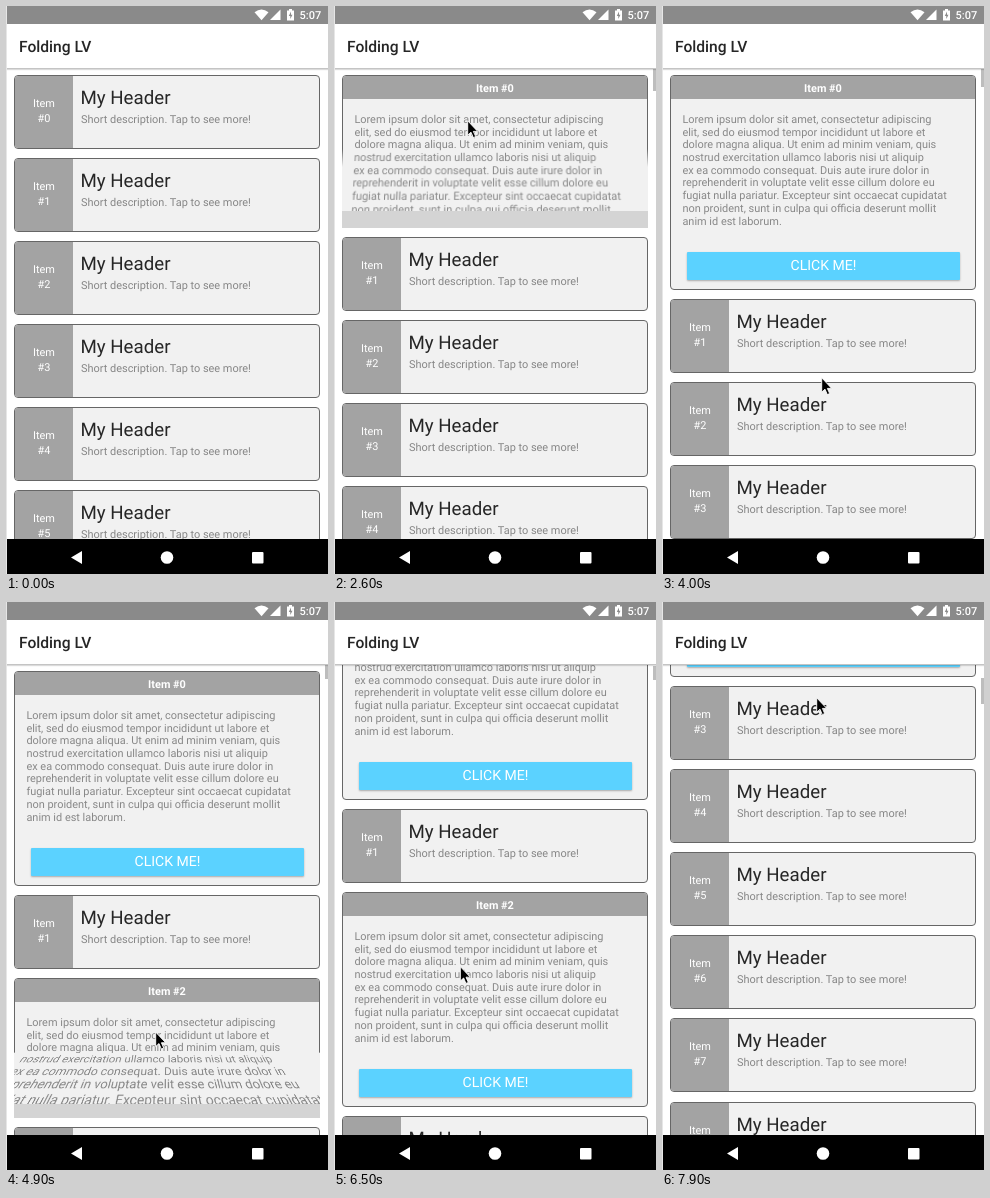
Recreate the animation shown at these times as an HTML page. Size 322 by 568 pixels, loop 8000 ms.

```html
<!DOCTYPE html>
<html lang="en">
<head>
<meta charset="utf-8">
<title>Folding list</title>
<style>
html, body { margin: 0; width: 100%; height: 100%; overflow: hidden; background: #fff; }
#stage { position: relative; width: 322px; height: 568px; overflow: hidden; background: #fff;
  font: 10.94px/12.7px Roboto, sans-serif; white-space: nowrap; text-rendering: geometricPrecision; }
#stage div, #stage svg { position: absolute; box-sizing: border-box; }
.cell { left: 8px; width: 306px; overflow: hidden; }
.part { left: 0; width: 306px; overflow: hidden; }
.face { left: 0; width: 306px; border: 1px solid #666; border-radius: 4px; background: #f1f1f1; overflow: hidden; }
.title { height: 74px; }
.content { height: 215px; }
.tag { left: 0; top: 0; width: 58px; height: 72px; padding-top: 20.4px; background: #a3a3a3; color: #fff;
  line-height: 15px; text-align: center; }
.head { left: 65.5px; top: 10.6px; font-size: 18.7px; line-height: 22px; color: #262626; }
.desc { left: 66px; top: 38.4px; color: #868686; }
.bar { left: 0; top: 0; width: 304px; height: 23px; background: #a3a3a3; color: #fff; font-weight: 700;
  line-height: 25px; text-align: center; }
.body { left: 11.4px; top: 37.9px; color: #888; }
.button { left: 16px; top: 175.6px; width: 273px; height: 28.4px; border-radius: 1px; background: #5bd2ff; color: #fff;
  font-size: 14.05px; line-height: 29.4px; text-align: center; box-shadow: 0 1px 2px rgba(0,0,0,.3); }
.back { left: 0; width: 306px; background: #d4d4d4; transform-origin: 50% 100%; }
.title.flap { transform-origin: 50% 100%; }
#thumb { left: 318.5px; width: 3.5px; background: #bdbdbd; }
#tools { left: 0; top: 18px; width: 322px; height: 44.5px; background: #fff; border-bottom: 1px solid #c4c4c4;
  box-shadow: 0 1px 1px rgba(0,0,0,.14); padding-left: 13px; color: #262626;
  font-weight: 500; font-size: 15.6px; line-height: 47px; }
#chrome, #cursor { left: 0; top: 0; }
</style>
</head>
<body>
<div id="stage">
  <div id="list"></div>
  <div id="thumb"></div>
  <div id="tools">Folding LV</div>
  <svg id="chrome" width="322" height="568">
    <rect width="322" height="18" fill="#8a8a8a"/>
    <rect y="533" width="322" height="35"/>
    <rect width="1" height="568" fill="#e6e6e6"/>
    <g fill="#fff">
      <path d="M248.5 6.2Q255.5 0.8 262.5 6.2L255.5 14.2Z"/>
      <path d="M264 14L274.5 3.5V14Z"/>
      <path d="M281 4.5H283V3H286V4.5H288V14.5H281Z"/>
      <text x="293.5" y="13" font-family="Roboto, sans-serif" font-weight="500" font-size="11">5:07</text>
      <path d="M65 551.5L76 545V558Z"/>
      <circle cx="161" cy="551.5" r="6.3"/>
      <rect x="246" y="546" width="11.5" height="11.5" rx="1"/>
    </g>
    <path d="M285 5.5L282.8 10H284.3V13L286.5 8.8H285Z" fill="#8a8a8a"/>
  </svg>
  <svg id="cursor" width="14" height="20">
    <path d="M.7 .8V15.2L4 12.2L6.3 17.6L8.7 16.6L6.4 11.4H10.7Z" stroke="#fff" stroke-width=".9"/>
  </svg>
</div>
<script>
const LOOP = 8000, FLIP = 450, LIFT = 0.32, DROP_END = 1.25;
const LIST_TOP = 62.5, LIST_BOTTOM = 533, FIRST = 68.7, GAP = 9.1, COUNT = 100;
const PARTS = [74, 74, 22, 22, 23];
const OPEN_AT = { 0: 2050, 2: 4500 };
const DRAGS = [[6300, 6900], [7350, 7900]];
// time, x, y of the pointer
const PATH = [
  [800, -14, 330], [1100, 146, 122], [2150, 146, 122], [2600, 133, 114], [3100, 132, 114],
  [4000, 159, 371], [4400, 149, 430], [5700, 149, 428], [6100, 134, 449], [6300, 129, 449.5],
  [6900, 116, 119], [7350, 149, 280.5], [7900, 154, 95]
];
const LOREM = `Lorem ipsum dolor sit amet, consectetur adipiscing
elit, sed do eiusmod tempor incididunt ut labore et
dolore magna aliqua. Ut enim ad minim veniam, quis
nostrud exercitation ullamco laboris nisi ut aliquip
ex ea commodo consequat. Duis aute irure dolor in
reprehenderit in voluptate velit esse cillum dolore eu
fugiat nulla pariatur. Excepteur sint occaecat cupidatat
non proident, sunt in culpa qui officia deserunt mollit
anim id est laborum.`.replace(/\n/g, '<br>');

const $ = id => document.getElementById(id);
const clamp = (v, a, b) => Math.min(b, Math.max(a, v));
const show = (el, on) => { el.style.display = on ? '' : 'none'; };

function add(parent, cls, html = '', style = '') {
  const el = document.createElement('div');
  el.className = cls;
  el.innerHTML = html;
  el.style.cssText = style;
  parent.append(el);
  return el;
}

const titleHTML = i => `<div class="tag">Item<br>#${i}</div><div class="head">My Header</div>
  <div class="desc">Short description. Tap to see more!</div>`;
const contentHTML = i => `<div class="bar">Item #${i}</div><div class="body">${LOREM}</div>
  <div class="button">CLICK ME!</div>`;

function makeCell(i) {
  const cell = { el: add($('list'), 'cell'), start: OPEN_AT[i] ?? Infinity };
  if (i in OPEN_AT) {
    let top = 0;
    cell.parts = PARTS.map(h => {
      const part = add(cell.el, 'part', '', `top:${top}px;height:${h}px;transform-origin:50% 0`);
      add(part, 'face content', contentHTML(i), `top:${-top}px`);
      top += h;
      return part;
    });
    // the underside of each following strip lies over the end of its part
    let end = PARTS[0];
    cell.flaps = PARTS.slice(1, -1).map((h, k) => {
      end += h;
      const size = PARTS[k + 2];
      return add(cell.el, 'back', '', `top:${end - size}px;height:${size}px`);
    });
    cell.whole = add(cell.el, 'face content', contentHTML(i), 'top:0');
  }
  cell.title = add(cell.el, 'face title flap', titleHTML(i), 'top:0');
  if (cell.flaps) cell.flaps.unshift(cell.title);
  return cell;
}
const cells = Array.from({ length: 9 }, (_, i) => makeCell(i));

function tilt(el, deg) {
  show(el, Math.abs(deg) < 89.9);
  el.style.transform = deg ? `perspective(128px) rotateX(${deg}deg)` : 'none';
}

// sets the fold pose and returns the height of the cell
function fold(cell, t) {
  const u = Math.max(0, (t - cell.start) / FLIP);
  if (cell.parts) {
    const done = u >= PARTS.length - 2 + DROP_END;
    show(cell.whole, done);
    cell.flaps.forEach((f, k) => tilt(f, done ? 90 : -90 * clamp((u - k) / LIFT, 0, 1)));
    cell.parts.forEach((p, k) => {
      const drop = k ? clamp((u - k + 1 - LIFT) / (DROP_END - LIFT), 0, 1) : 1;
      tilt(p, done || !u ? 90 : 90 * (1 - drop));
    });
  }
  return PARTS.reduce((h, p, k) => h + p * (k ? clamp(u - k + 1, 0, 1) : 1), 0);
}

function pointer(t) {
  const n = PATH.findIndex(p => p[0] > t);
  if (n === 0) return PATH[0].slice(1);
  if (n < 0) return PATH[PATH.length - 1].slice(1);
  const [t0, x0, y0] = PATH[n - 1], [t1, x1, y1] = PATH[n];
  const u = (t - t0) / (t1 - t0), e = u * u * (3 - 2 * u);
  return [x0 + (x1 - x0) * e, y0 + (y1 - y0) * e];
}

function draw(t) {
  const scroll = DRAGS.reduce((s, [a, b]) => s + pointer(a)[1] - pointer(clamp(t, a, b))[1], 0);
  let y = FIRST - scroll, passed = 0, seen = 0;
  for (const cell of cells) {
    const h = fold(cell, t);
    cell.el.style.top = Math.round(y) + 'px';
    cell.el.style.height = h + 'px';
    passed += clamp((LIST_TOP - y) / h, 0, 1);
    seen += Math.max(0, Math.min(y + h, LIST_BOTTOM) - Math.max(y, LIST_TOP)) / h;
    y += h + GAP;
  }
  const unit = (LIST_BOTTOM - LIST_TOP) / COUNT;
  show($('thumb'), t >= 2150);
  $('thumb').style.top = LIST_TOP + passed * unit + 'px';
  $('thumb').style.height = seen * unit + 'px';
  const [px, py] = pointer(t);
  $('cursor').style.transform = `translate(${px}px,${py}px)`;
}

let begin;
function tick(now) {
  begin ??= now;
  draw((now - begin) % LOOP);
  requestAnimationFrame(tick);
}
draw(0);
requestAnimationFrame(tick);
</script>
</body>
</html>
```
